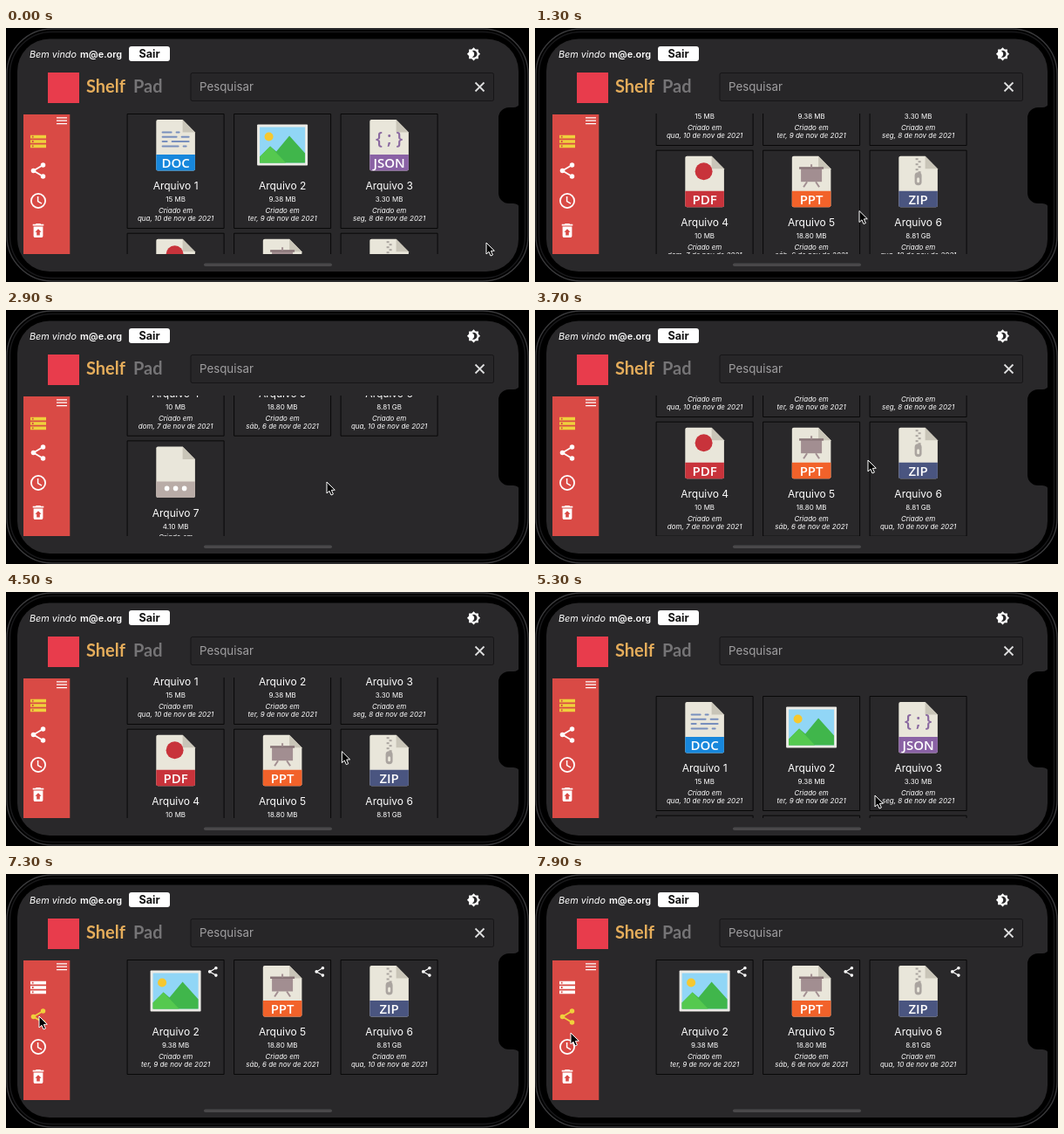
These frames come from a looping animation (600x291 px, 8000 ms). An HTML page with a canvas:

```html
<!DOCTYPE html>
<html lang="pt-BR">
<head>
<meta charset="utf-8">
<title>Arquivos</title>
<style>
html, body { margin: 0; width: 100%; height: 100%; overflow: hidden; background: #000; }
canvas { display: block; width: 100vw; height: 100vh; }
</style>
</head>
<body>
<canvas id="stage"></canvas>
<script>
const W = 600, H = 291, LOOP = 8000;
const canvas = document.getElementById('stage');
const ctx = canvas.getContext('2d');
const dpr = window.devicePixelRatio || 1;
canvas.width = W * dpr;
canvas.height = H * dpr;

const SANS = 'Inter, "Liberation Sans", sans-serif';
const LABEL = '"Open Sans", "Noto Sans", sans-serif';
const BG = '#29282a', WHITE = '#fff', YELLOW = '#f0d03c', PAGE = '#e9e6da';
const TOP = 98.5, ROW = 136.7, COL = 122.5, SHARE_AT = 7300;

const FILES = [
  { type: 'DOC', size: '15 MB', date: 'qua, 10', color: '#1787dc' },
  { type: 'IMG', size: '9.38 MB', date: 'ter, 9' },
  { type: 'JSON', size: '3.30 MB', date: 'seg, 8', color: '#8a62a5' },
  { type: 'PDF', size: '10 MB', date: 'dom, 7', color: '#c8333b' },
  { type: 'PPT', size: '18.80 MB', date: 'sáb, 6', color: '#f2622a' },
  { type: 'ZIP', size: '8.81 GB', date: 'qua, 10', color: '#4a5580' },
  { type: '', size: '4.10 MB', date: 'sex, 5', color: '#b9aca7' }
].map((file, i) => ({ ...file, name: 'Arquivo ' + (i + 1) }));
const SHARED = [FILES[1], FILES[4], FILES[5]];

// Keys: time, value(s)
const SCROLL = [
  [1000, 0], [1300, 95], [1500, 190], [1700, 240], [1900, 254], [2500, 254],
  [2700, 243], [2900, 222], [3100, 176], [3300, 138], [3500, 116], [3700, 107],
  [4300, 107], [4500, 78], [4700, 42], [4900, 10], [5100, -12], [5300, -21],
  [5500, -8], [5700, 0]
];
const POINTER = [
  [300, 551, 246], [700, 480, 240], [1100, 376, 235], [1500, 368, 184],
  [1900, 368, 180], [2500, 368, 178], [2900, 368, 197], [3300, 374, 214],
  [3700, 382, 172], [4300, 384, 168], [4900, 388, 212], [5300, 390, 233],
  [5500, 376, 230], [5900, 200, 190], [6300, 71, 166], [6700, 42, 162],
  [7300, 38, 163], [7900, 41, 182]
];

const ICONS = {
  bright: 'M20 8.69V4h-4.69L12 .69 8.69 4H4v4.69L.69 12 4 15.31V20h4.69L12 23.31 15.31 20H20v-4.69L23.31 12zM12 18c-.89 0-1.74-.2-2.5-.55C11.56 16.5 13 14.42 13 12s-1.44-4.5-3.5-5.45C10.26 6.2 11.11 6 12 6c3.31 0 6 2.69 6 6s-2.69 6-6 6z',
  storage: 'M2 20h20v-4H2zm2-3h2v2H4zM2 4v4h20V4zm4 3H4V5h2zm-4 7h20v-4H2zm2-3h2v2H4z',
  restore: 'M19 4h-3.5l-1-1h-5l-1 1H5v2h14zM6 7v12c0 1.1.9 2 2 2h8c1.1 0 2-.9 2-2V7zm8 7v4h-4v-4H8l4-4 4 4z',
  menu: 'M3 18h18v-2H3zm0-5h18v-2H3zm0-7v2h18V6z'
};
for (const key in ICONS) ICONS[key] = new Path2D(ICONS[key]);

function sample(keys, t) {
  if (t <= keys[0][0]) return keys[0].slice(1);
  for (let i = 1; i < keys.length; i++) {
    const a = keys[i - 1], b = keys[i];
    if (t <= b[0]) {
      const p = (t - a[0]) / (b[0] - a[0]);
      return a.slice(1).map((v, j) => v + (b[j + 1] - v) * p);
    }
  }
  return keys[keys.length - 1].slice(1);
}

function rect(x, y, w, h, fill, r = 0) {
  ctx.beginPath();
  ctx.roundRect(x, y, w, h, r);
  ctx.fillStyle = fill;
  ctx.fill();
}

function outline(x, y, w, h, color, r = 0, width = 1) {
  ctx.beginPath();
  ctx.roundRect(x, y, w, h, r);
  ctx.strokeStyle = color;
  ctx.lineWidth = width;
  ctx.stroke();
}

function circle(x, y, r, fill) {
  ctx.beginPath();
  ctx.arc(x, y, r, 0, Math.PI * 2);
  ctx.fillStyle = fill;
  ctx.fill();
}

function trace(points) {
  ctx.beginPath();
  points.forEach(([x, y]) => ctx.lineTo(x, y));
}

function polygon(points, fill) {
  trace(points);
  ctx.closePath();
  ctx.fillStyle = fill;
  ctx.fill();
}

function line(points, color, width, cap = 'butt') {
  trace(points);
  ctx.strokeStyle = color;
  ctx.lineWidth = width;
  ctx.lineCap = cap;
  ctx.stroke();
}

function text(str, x, y, font, fill = WHITE, align = 'left') {
  ctx.font = font;
  ctx.fillStyle = fill;
  ctx.textAlign = align;
  ctx.fillText(str, x, y);
}

function at(x, y, scale, draw) {
  ctx.save();
  ctx.translate(x, y);
  ctx.scale(scale, scale);
  draw();
  ctx.restore();
}

function icon(name, x, y, scale, color) {
  at(x, y, scale, () => {
    ctx.translate(-12, -12);
    ctx.fillStyle = color;
    ctx.fill(ICONS[name], 'evenodd');
  });
}

function shareIcon(x, y, scale, color) {
  at(x, y, scale, () => {
    line([[6, -7], [-6, 0], [6, 7]], color, 2);
    [[6, -7], [-6, 0], [6, 7]].forEach(([cx, cy]) => circle(cx, cy, 3, color));
  });
}

function clockIcon(x, y, color) {
  outline(x - 8.1, y - 8.1, 16.2, 16.2, color, 8.1, 1.8);
  line([[x - .4, y - 5], [x - .4, y + .6], [x + 4, y + 3.2]], color, 1.5);
}

function phone() {
  rect(0, 0, W, H, '#000');
  outline(1, 1, 598, 289, '#3a3a3c', 52, 1.4);
  outline(4.5, 4.5, 591, 282, '#18181a', 48, 1.5);
  rect(13, 12.5, 575, 266.5, BG, 37);
  ctx.beginPath();
  ctx.moveTo(590, 85);
  ctx.quadraticCurveTo(588, 91, 582, 91);
  ctx.lineTo(577, 91);
  ctx.arcTo(565, 91, 565, 103, 12);
  ctx.lineTo(565, 189);
  ctx.arcTo(565, 201, 577, 201, 12);
  ctx.lineTo(582, 201);
  ctx.quadraticCurveTo(588, 201, 590, 207);
  ctx.fillStyle = '#000';
  ctx.fill();
  rect(227, 269.5, 147, 3.6, '#49484a', 1.8);
}

function header() {
  text('Bem vindo', 27, 33.5, 'italic 10.8px ' + SANS);
  text('m@e.org', 85, 33.5, '600 10.9px ' + SANS);
  rect(141, 21, 47, 17, WHITE, 3);
  text('Sair', 164.5, 34, 'bold 12.6px ' + SANS, '#111', 'center');
  icon('bright', 536.5, 29.8, .67, WHITE);

  rect(48, 51, 36, 35, '#e83c4c');
  text('Shelf', 92, 73.5, 'bold 20px Lato, sans-serif', '#e5ad5b');
  text('Pad', 146, 73.5, 'bold 20px Lato, sans-serif', '#757476');

  rect(212, 51.5, 347.5, 32, '#272628', 2);
  outline(212, 51.5, 347.5, 32, '#161517', 2);
  text('Pesquisar', 222, 72, '13.3px ' + SANS, '#a09fa1');
  line([[538.5, 62.5], [548.5, 72.5]], '#dededf', 1.8);
  line([[548.5, 62.5], [538.5, 72.5]], '#dededf', 1.8);
}

function sidebar(sharing) {
  rect(20, 99, 53.3, 160, '#d94a45');
  icon('menu', 64, 106.2, .67, WHITE);
  icon('storage', 37, 130, .9, sharing ? WHITE : YELLOW);
  shareIcon(37, 163.5, .92, sharing ? YELLOW : WHITE);
  clockIcon(37, 198, WHITE);
  icon('restore', 37, 232, .9, WHITE);
}

// Pictures use the card's centre line as x = 0 and its top edge as y = 0.
function picture() {
  rect(-29, 12, 58, 47, '#ecebe6', 1);
  rect(-26, 15, 52, 41, '#91d6f6');
  circle(-15.5, 26, 5, '#f6c82f');
  polygon([[-26, 56], [-26, 49], [-14, 37], [-7, 43], [8, 25], [26, 45], [26, 56]], '#40b64b');
  polygon([[-26, 56], [-26, 49], [-14, 37], [4, 56]], '#55c94f');
}

const GLYPHS = {
  DOC() {
    const ink = '#788fbd';
    [[-16, -4], [0, 5], [-16, 2], [6, 16], [-16, -9], [-5, 16], [-16, 4], [8, 13]].forEach(([a, b], i) => {
      const y = 21 + Math.floor(i / 2) * 5.3;
      line([[a + 1, y], [b - 1, y]], ink, 2, 'round');
    });
  },
  JSON() {
    text('{ ; }', 0, 34, '600 20px ' + LABEL, '#8a68a0', 'center');
  },
  PDF() {
    circle(-1, 24, 10, '#c8333b');
  },
  PPT() {
    const ink = '#a28e91';
    rect(-12, 21, 24, 15, ink);
    rect(-14, 19, 28, 2.5, '#887477');
    line([[0, 16], [0, 20]], ink, 2);
    line([[-5, 36], [-9, 42]], ink, 2);
    line([[5, 36], [9, 42]], ink, 2);
  },
  ZIP() {
    const ink = '#aaa49f';
    for (let i = 0; i < 6; i++) rect(i % 2 ? 0 : -3, 9 + i * 3, 3, 2, ink);
    rect(-4, 25, 8, 15, ink, 4);
    rect(-1.5, 31, 3, 6, PAGE, 1.5);
  }
};

function page({ type, color }) {
  ctx.beginPath();
  ctx.moveTo(8, 6.5);
  ctx.lineTo(22.3, 21);
  ctx.lineTo(22.3, 63);
  ctx.arcTo(22.3, 65, 20, 65, 2);
  ctx.arcTo(-22.3, 65, -22.3, 63, 2);
  ctx.arcTo(-22.3, 6.5, -20, 6.5, 2);
  ctx.closePath();
  ctx.fillStyle = PAGE;
  ctx.fill();
  polygon([[8, 6.5], [22.3, 21], [8, 21]], '#c9c5b8');
  rect(-22.3, 46.5, 44.6, 18.5, color, [0, 0, 2, 2]);
  if (type) {
    GLYPHS[type]();
    text(type, 0, 61.3, '600 15px ' + LABEL, WHITE, 'center');
  } else {
    [-10, 0, 10].forEach(x => circle(x, 54.5, 2.8, WHITE));
  }
}

function card(file, x, y, sharing) {
  at(x, y, 1, () => {
    outline(-55.5, 0, 111, 131, '#080808');
    file.type === 'IMG' ? picture() : page(file);
    text(file.name, 0, 86.8, '12px ' + SANS, WHITE, 'center');
    text(file.size, 0, 100.8, '8px ' + SANS, WHITE, 'center');
    text('Criado em', 0, 113.3, 'italic 8px ' + SANS, WHITE, 'center');
    text(file.date + ' de nov de 2021', 0, 122.7, 'italic 8px ' + SANS, WHITE, 'center');
    if (sharing) shareIcon(42.7, 13.4, .6, WHITE);
  });
}

function grid(files, scroll, sharing) {
  ctx.save();
  ctx.beginPath();
  ctx.rect(100, 98, 420, 161);
  ctx.clip();
  files.forEach((file, i) => {
    const y = TOP + Math.floor(i / 3) * ROW - scroll;
    if (y > -40 && y < 260) card(file, 194.6 + (i % 3) * COL, y, sharing);
  });
  ctx.restore();
}

function pointer(x, y) {
  at(x, y, 1, () => {
    trace([[0, 0], [0, 13], [3, 10.3], [5, 15], [7.4, 14], [5.4, 9.4], [9.3, 9.2]]);
    ctx.closePath();
    ctx.fillStyle = '#000';
    ctx.fill();
    ctx.strokeStyle = WHITE;
    ctx.lineWidth = 1;
    ctx.stroke();
  });
}

// The picture holds for 500 ms, then advances every 200 ms.
const step = t => t < 500 ? 0 : 500 + Math.floor((t - 500) / 200) * 200;

function render(now) {
  const t = step(now % LOOP);
  const sharing = t >= SHARE_AT;
  ctx.setTransform(dpr, 0, 0, dpr, 0, 0);
  phone();
  header();
  sidebar(sharing);
  grid(sharing ? SHARED : FILES, sample(SCROLL, t)[0], sharing);
  pointer(...sample(POINTER, t));
}

let start;
function tick(now) {
  start ??= now;
  render(Math.max(0, now - start));
  requestAnimationFrame(tick);
}
render(0);
requestAnimationFrame(tick);
</script>
</body>
</html>
```
